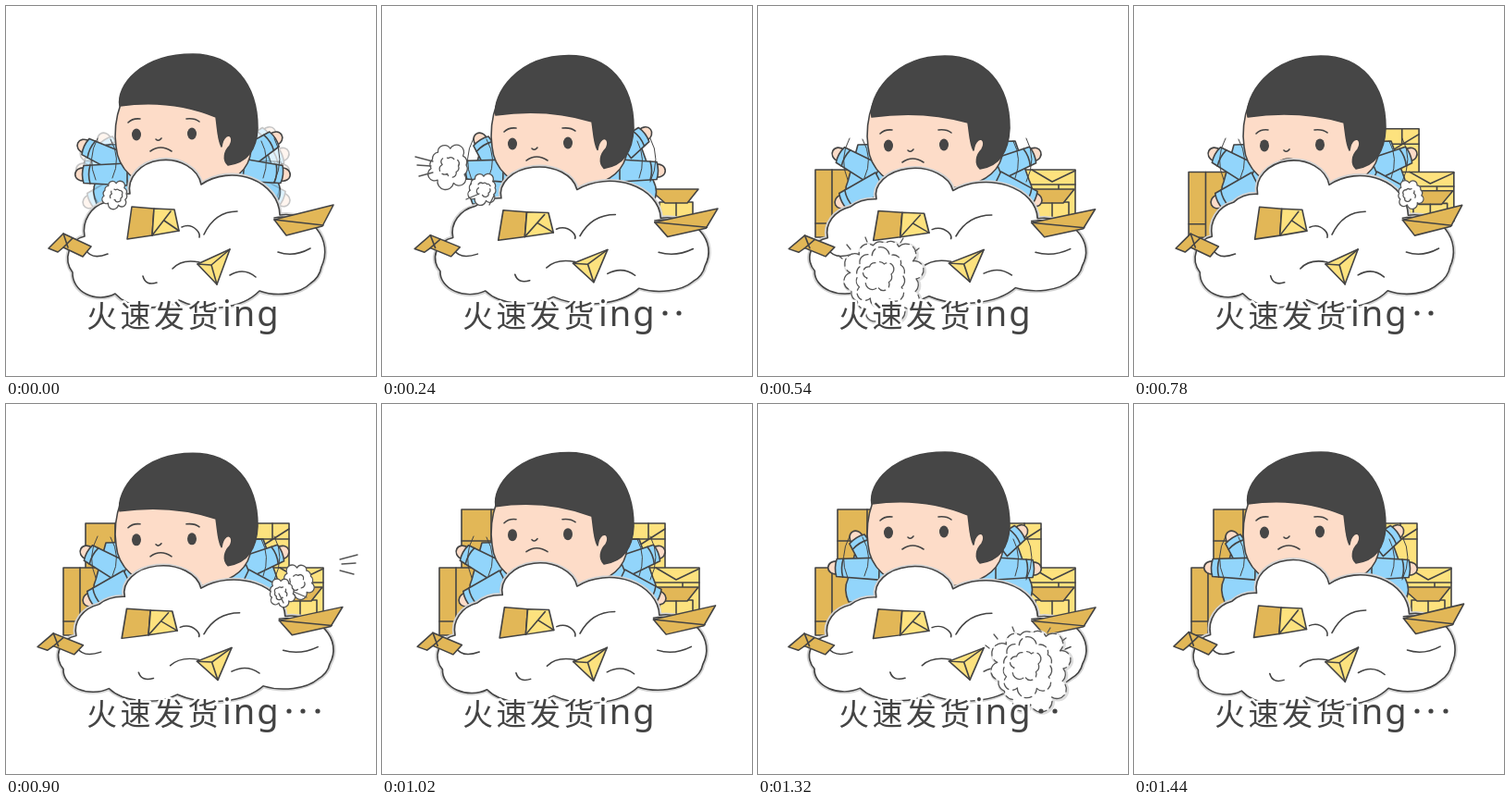
Write an HTML page that moves like this. It is 400 by 400 pixels and loops after 1500 ms.

```html
<!DOCTYPE html>
<html lang="zh">
<head>
<meta charset="utf-8">
<style>
  html, body { margin: 0; width: 100%; height: 100%; overflow: hidden; background: #fff; }
  svg { display: block; width: 100vw; height: 100vh; }
  .line { fill: none; stroke: #444; stroke-width: 1.6; stroke-linecap: round; stroke-linejoin: round; }
  .skin { fill: #fddcc8; } .blue { fill: #92d5fb; } .white { fill: #fff; }
  .dark { fill: #e2b757; } .light { fill: #fde27e; } .hair { fill: #464646; }
  .thin { stroke-width: 1; }
  .soft { stroke: #d4d4d4; stroke-width: 5; }
  .smoke { stroke: #555; stroke-width: 1.3; }
  .haze { stroke: #ddd; stroke-width: 4; }
  .broken { stroke-dasharray: 15 5 8 4; }
  text { fill: #444; stroke: #fff; stroke-width: 5; stroke-linejoin: round; paint-order: stroke; }
  .han { font: 500 33px "Noto Sans CJK SC", "Noto Sans CJK", sans-serif; letter-spacing: 3.5px; }
  .latin { font: 500 38px "Noto Sans", sans-serif; letter-spacing: 2px; }
</style>
</head>
<body>
<svg viewBox="0 0 400 400">
  <g id="stack"></g>
  <g id="arms"></g>
  <g id="head"></g>
  <g id="cloud"></g>
  <g id="smoke"></g>
  <text class="han" x="87" y="347">火速发货</text>
  <text class="latin" x="234" y="346">ing</text>
  <g id="dots" fill="#444"></g>
</svg>
<script>
const STEP = 60, FRAMES = 25, TAU = Math.PI * 2;
const $ = id => document.getElementById(id);
const path = (d, cls = '') => `<path class="line ${cls}" d="${d}"/>`;
const group = (transform, body, opacity = 1) =>
  `<g transform="${transform}" opacity="${opacity}">${body}</g>`;
const scaleAt = (x, y, sx, sy) => `translate(${x} ${y}) scale(${sx} ${sy}) translate(${-x} ${-y})`;
const clamp = v => Math.max(0, Math.min(1, v));

// Sleeve from shoulder to cuff, with a rounded hand at the end
function arm(x, y, x2, y2) {
  const len = Math.hypot(x2 - x, y2 - y), angle = Math.atan2(y2 - y, x2 - x) * 360 / TAU;
  return group(`translate(${x} ${y}) rotate(${angle})`,
    path(`M${len - 2} -7C${len + 13} -9 ${len + 13} 9 ${len - 2} 7Z`, 'skin') +
    path(`M-5 -12L${len} -9.5Q${len + 3} 0 ${len} 9.5L-5 12Z`, 'blue') +
    path(`M${len - 7} -10Q${len - 4} 0 ${len - 7} 10`));
}

const raised = arm(122, 170, 107, 146) + arm(126, 178, 85, 177) + arm(266, 152, 283, 139) + arm(262, 178, 297, 178);
const spread = arm(123, 180, 89, 161) + arm(128, 193, 92, 211) + arm(265, 174, 297, 161) + arm(262, 192, 298, 209);
const blurred = group('', spread, .3) + group('', raised, .3) +
  arm(124, 170, 86, 152) + arm(126, 182, 84, 182) + arm(265, 160, 290, 144) + arm(262, 178, 298, 182);
const torso = path('M98 214Q92 200 97 190L108 150 278 146 293 188Q300 202 293 212Z', 'blue');
const swish = path('M97 188Q87 165 99 143M115 186Q125 165 113 144M290 143Q302 165 290 190M276 146Q286 165 278 186', 'thin');

// Nodding slides the face and fringe down while the crown hardly moves
function head(nod) {
  const top = 52 + 2 * nod, left = 108 + 12 * nod, tip = 172 + 4 * nod;
  const face = '<ellipse cx="141" cy="139" rx="5" ry="6.5" class="hair"/><ellipse cx="201" cy="138" rx="5" ry="6.5" class="hair"/>' +
    path('M132 126Q137 121 145 122M195 122Q204 121 209 125M162 144Q165 147 168 143M156 157Q167 149 179 157');
  return path('M124 106C119 120 117 138 119 152C121 176 140 194 168 198L220 196C247 190 263 178 265 156L240 100Z', 'skin') +
    group(`translate(0 ${12 * nod})`, face) +
    path(`M123 ${left}C119 ${left - 22} 146 ${top} 202 ${top}C245 ${top} 272 84 272 132C271 155 262 ${tip - 3} 240 ${tip}
      C234 ${tip - 6} 236 ${tip - 15} 242 ${tip - 21}C246 ${tip - 28} 243 ${tip - 34} 238 ${tip - 31}Q234 ${tip - 28} 233 ${tip - 20}
      C229 ${tip - 27} 229 ${tip - 38} 227 ${120 + 6 * nod}Q178 ${left - 8} 123 ${left}Z`, 'hair');
}

const cloudShape = 'M85 249A32 32 0 0 1 108 212A32 26 0 0 1 134 203A37 30 0 0 1 211 193A52 44 0 0 1 296 226A42 40 0 0 1 341 282A30 28 0 0 1 329 300A40 24 0 0 1 274 308A60 40 0 0 1 187 318A45 30 0 0 1 118 311A30 26 0 0 1 72 288A22 24 0 0 1 85 249Z';
const cloud =
  path(cloudShape, 'soft') + path(cloudShape, 'white') +
  path('M190 239Q199 235 206 242Q210 246 209 250M250 222Q226 222 214 247M290 229Q309 225 321 238M86 263Q92 275 110 268M180 284Q190 273 209 277M148 292Q151 303 163 299M270 293Q257 282 242 291M294 266Q311 272 329 262') +
  path('M46 262L62 246 92 260 83 271 62 261 56 266Z', 'dark') + path('M62 246L67 261M62 261L72 251') +
  path('M136 217L160 219 158 248 131 252Z', 'dark') + path('M160 219L182 220 187 243 158 248Z', 'light') +
  path('M158 248L178 222M171 232L187 243') +
  path('M290 231L354 215 342 238 303 248Z', 'dark') + path('M290 231L343 237') +
  path('M242 263L207 279 228 301Z', 'light') + path('M242 263L222 280 228 301M207 279L222 280');

// Boxes behind the figure: first step they show, then their drawing
const boxes = [
  [15, path('M86 114H126V184H86Z', 'dark') + path('M118 114V184M86 148H118')],
  [11, path('M264 129H306V184H264Z', 'light') + path('M264 146H306M270 158L306 135M288 129V146')],
  [6, path('M62 177H112V250H62Z', 'dark') + path('M80 177V250M62 235H80')],
  [7, path('M283 177H343V232H283Z', 'light') + path('M283 193H343M296 177L318 190 343 178M325 193V232')],
  [2, path('M300 212H336V232H300Z', 'light') + path('M289 198H342L330 213H306Z', 'dark') + path('M318 213V232')]
];

// Ring of n outward bumps of uneven size
function puff(x, y, r, n, cls = 'white smoke broken') {
  const at = i => {
    const a = (i + .25 * Math.sin(i * 5)) * TAU / n, d = r * (1 + .06 * Math.sin(i * 7));
    return `${x + d * Math.cos(a)} ${y + d * Math.sin(a)}`;
  };
  const bump = r * Math.sin(Math.PI / n) * 1.1;
  let d = 'M' + at(0);
  for (let i = 1; i < n; i++) d += `A${bump} ${bump} 0 0 1 ${at(i)}`;
  return path(`${d}A${bump} ${bump} 0 0 1 ${at(0)}Z`, cls);
}
const fluff = (x, y, r) => puff(x, y, r, 9, 'white smoke') + puff(x + 2, y + 1, r * .45, 6);
const burst = puff(1, 1, 37, 13, 'white haze') + puff(0, 0, 37, 13) + puff(-2, -3, 25, 10) + puff(-3, -5, 13, 7) +
  path('M-43 -22L-47 -25M-34 -32L-38 -37M-16 -40L-18 -45M20 -39L23 -44M36 -30L40 -33', 'smoke');

function trail(p) {
  const one = t => fluff(118 - 46 * t * t, 203 - 31 * t * t, 12 + 7 * t * t);
  const streaks = path('M36 163L55 168M38 172L53 173M40 184L55 180M91 209L105 203M116 215L121 205', 'smoke thin');
  return one(p / 4) + (p > 2.2 ? one((p - 2.2) / 4) + streaks : '');
}

// Each half loop: a puff flies off to one side, then a burst lands in front
function smoke(f) {
  const p = f % 12.5, onLeft = f < 12.5;
  if (p < 4.4) return group(onLeft ? '' : 'translate(416 0) scale(-1 1)', trail(p));
  if (p < 6 || p > 11) return '';
  const s = clamp(.55 + (p - 6) * .3), place = onLeft ? '134 295' : '293 286';
  return group(`translate(${place}) scale(${s})`, burst, clamp((11 - p) / 1.5));
}

function draw(f) {
  const phase = f / 6.25;
  const squash = (1 - Math.cos(TAU * phase)) / 2;
  const sway = Math.max(0, Math.cos(TAU * (phase - .12)));
  const nod = clamp(1.3 * Math.sin(Math.PI * f / 18));

  $('stack').innerHTML = group(scaleAt(204, 260, 1 + .021 * sway, 1 - .03 * sway),
    boxes.map(([start, body]) => {
      const rise = clamp((f - start + 1) / 2);
      return f < start ? '' : group(`translate(0 ${30 * (1 - rise)})`, body);
    }).join(''));

  $('arms').innerHTML = torso + (f === 0 ? blurred : f % 2 ? spread : raised) + swish;
  $('head').innerHTML = head(nod);
  $('cloud').innerHTML = group(scaleAt(214, 269, 1 + .078 * squash, 1 - .09 * squash), cloud);
  $('smoke').innerHTML = smoke(f);

  const dots = Math.floor(f % 9 / 2) % 4;
  $('dots').innerHTML = [306, 321, 337].slice(0, dots)
    .map(x => `<circle cx="${x}" cy="332" r="2.6"/>`).join('');
}

let shown = -1;
function tick() {
  const f = Math.floor(performance.now() / STEP) % FRAMES;
  if (f !== shown) draw(shown = f);
  requestAnimationFrame(tick);
}
tick();
</script>
</body>
</html>
```
